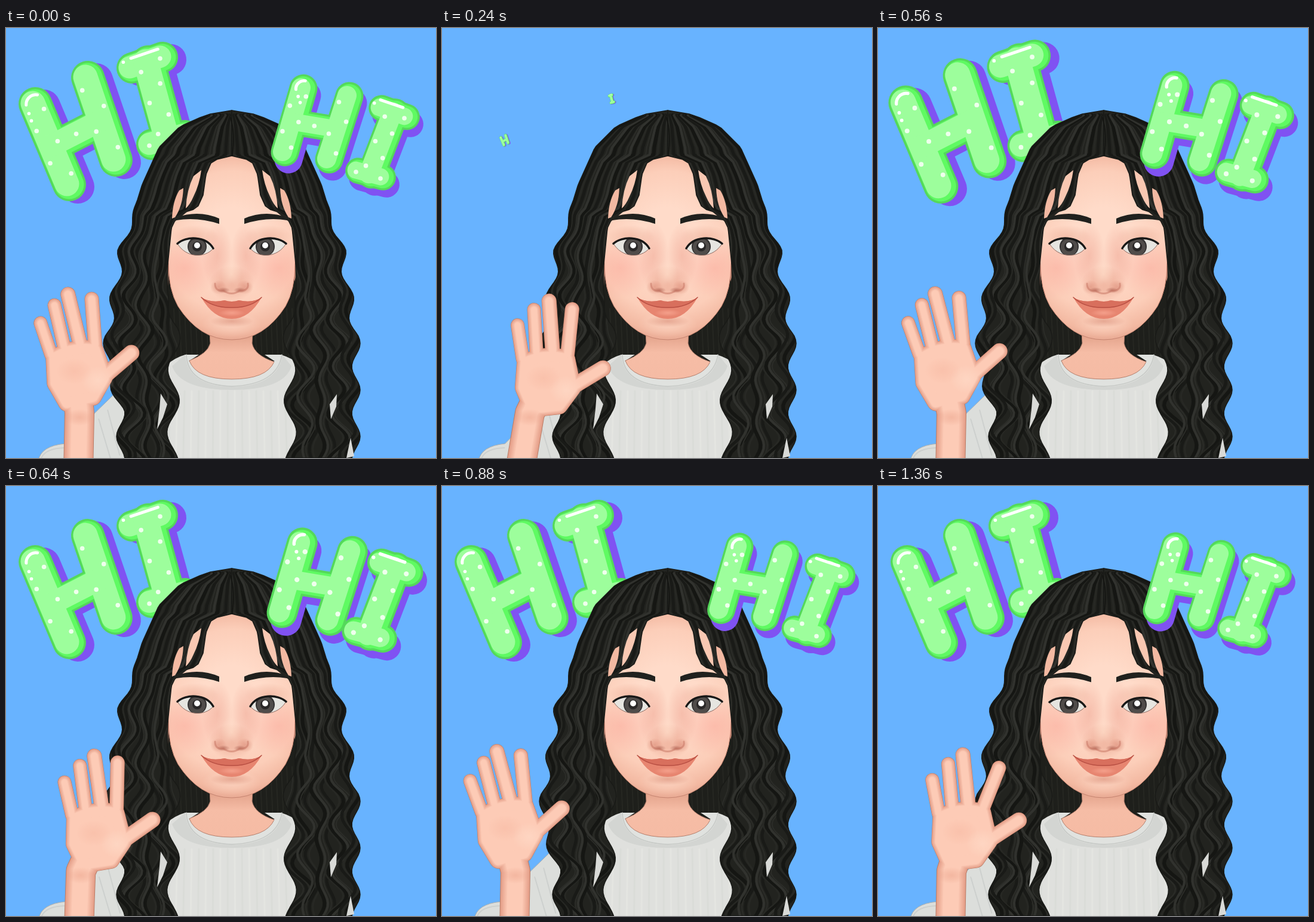
Recreate the animation shown at these times as an HTML page with a canvas. Size 720 by 720 pixels, loop 1.44 s.

```html
<!DOCTYPE html>
<html lang="en">
<head>
<meta charset="utf-8">
<title>Waving hello</title>
<style>
html, body { margin: 0; height: 100%; overflow: hidden; background: #68b3ff; }
canvas { display: block; width: 100vw; height: 100vh; }
</style>
</head>
<body>
<canvas id="stage" width="720" height="720"></canvas>
<script>
const ctx = document.getElementById('stage').getContext('2d');
const STEP = 80, STEPS = 18, MID = 378, TAU = 2 * Math.PI;
const mix = (a, b, t) => a + (b - a) * t;
const clamp = v => Math.max(0, Math.min(1, v));
const between = (p, q, t) => [mix(p[0], q[0], t), mix(p[1], q[1], t)];
const bump = (v, at, width) => Math.exp(-(((v - at) / width) ** 2));

// piecewise linear curve through [input, output] keys
function along(keys, v) {
  const i = Math.max(1, keys.findIndex(k => k[0] >= v));
  const [a, x] = keys[i - 1], [b, y] = keys[i];
  return mix(x, y, (v - a) / (b - a));
}
function trace(pts, close) {
  ctx.beginPath();
  pts.forEach(([x, y]) => ctx.lineTo(x, y));
  if (close) ctx.closePath();
}
function poly(pts, color) {
  trace(pts, true);
  ctx.fillStyle = color;
  ctx.fill();
}
function line(pts, width, color) {
  trace(pts);
  ctx.lineWidth = width;
  ctx.strokeStyle = color;
  ctx.stroke();
}
function shape(d, fill, stroke, width = 1) {
  const p = new Path2D(d);
  if (fill) { ctx.fillStyle = fill; ctx.fill(p); }
  if (stroke) { ctx.strokeStyle = stroke; ctx.lineWidth = width; ctx.stroke(p); }
}
function disc(x, y, r, color) {
  ctx.beginPath();
  ctx.arc(x, y, r, 0, TAU);
  ctx.fillStyle = color;
  ctx.fill();
}
// soft elliptical spot of colour
function glow(x, y, rx, ry, rgb, alpha) {
  ctx.save();
  ctx.translate(x, y);
  ctx.scale(rx, ry);
  const g = ctx.createRadialGradient(0, 0, 0, 0, 0, 1);
  [1, .55, 0].forEach((f, i) => g.addColorStop(i / 2, `rgba(${rgb},${alpha * f})`));
  disc(0, 0, 1, g);
  ctx.restore();
}
// draws once as is and once flipped about the middle of the face
function bothSides(paint) {
  [-1, 1].forEach(side => {
    ctx.save();
    ctx.translate(MID, 0);
    ctx.scale(side, 1);
    paint(side);
    ctx.restore();
  });
}

// ---- balloon letters: H has two stems, I has two serifs; the third bar joins them
const leftWord = { width: 56, shadow: [14, 4], letters: [
  { kind: 'H', bars: [[[49, 127], [106, 262]], [[137, 83], [184, 221]]], away: [-17, 12] },
  { kind: 'I', bars: [[[211, 67], [262, 49]], [[244, 195], [300, 180]]], away: [31, -4] }] };
const rightWord = { width: 47, shadow: [6, 12], letters: [
  { kind: 'H', bars: [[[498, 101], [467, 208]], [[575, 114], [541, 220]]], away: [3, 7] },
  { kind: 'I', bars: [[[629, 134], [671, 149]], [[590, 239], [631, 250]]], away: [2, 7] }] };

function dotsOn([p, q], count, flip, width) {
  const dx = q[0] - p[0], dy = q[1] - p[1], reach = width * .23 / Math.hypot(dx, dy);
  for (let i = 0; i < count; i++) {
    const [x, y] = between(p, q, (i + .5) / count), side = (i + flip) % 2 ? -reach : reach;
    disc(x - 3 + dy * side, y - dx * side, 3.8, '#efffed');
  }
}
function letter({ kind, bars: [a, b], away }, width, shadow, scale) {
  const isH = kind === 'H';
  const link = [between(...a, .53), between(...b, .53)];
  const center = between(...link, .5);
  const bars = [[a, isH ? 1 : .93], [b, isH ? 1 : .93], [link, isH ? .93 : 1.02]];
  const coat = (color, inset, dx, dy) => bars.forEach(([bar, f]) =>
    line(bar.map(([x, y]) => [x + dx, y + dy]), width * f - inset, color));
  ctx.save();
  ctx.translate(center[0] + away[0] * Math.max(0, 1 - scale), center[1] + away[1] * Math.max(0, 1 - scale));
  ctx.scale(scale, scale);
  ctx.translate(-center[0], -center[1]);
  coat('#8052f2', 0, ...shadow);
  coat('#55d85a', 0, 0, 0);
  coat('#5ffa62', 7, 0, 0);
  coat('#9dfe9c', 15, -4, -1);
  if (isH) {
    dotsOn(a, 5, 0, width);
    dotsOn(b, 4, 1, width);
    dotsOn(link, 1, 0, 0);
  } else {
    dotsOn(link, 5, 1, width);
    a.concat(b).forEach(([x, y], i) => i !== 0 && disc(x - 4, y + 2, 3.8, '#efffed'));
  }
  // gloss on the upper left rim
  const [x, y] = a[0], r = width * .29;
  if (isH) {
    ctx.beginPath();
    ctx.arc(x + 1, y + 1, r, Math.PI * .98, Math.PI * 1.55);
    ctx.lineWidth = 5;
    ctx.strokeStyle = '#fff';
    ctx.stroke();
    disc(x - r * .65, y + r, 2.8, '#fff');
    disc(x - r * .4, y + r * 1.75, 2.8, '#fff');
  } else {
    line([[x - 2, y - r], between([x, y - r], [a[1][0], a[1][1] - r], .85)], 5, '#fff');
    disc(x - r * .9, y - r * .6, 2.8, '#fff');
  }
  ctx.restore();
}
// springs from a speck to full size with a damped overshoot
const pop = age => age < 1 ? 0 : 1 - .91 * Math.exp(-.75 * (age - 1)) * Math.cos(.95 * (age - 1));
function word({ letters, width, shadow }, step, delay) {
  const scale = step < 2 ? 1 : pop(step - delay);
  if (scale) letters.forEach(l => letter(l, width, shadow, scale));
}

// ---- hair: half widths of the outer and inner edge at a given height
const outerKeys = [[138, 0], [145, 42], [165, 87], [200, 122], [262, 150], [372, 184], [515, 208], [720, 208]];
const innerKeys = [[214, 0], [222, 33], [245, 43], [280, 48], [302, 58], [312, 90], [335, 101], [395, 107], [440, 108], [500, 96], [720, 99]];
const outerAt = (y, side) => along(outerKeys, y)
  + 7 * clamp((y - 290) / 60) * Math.cos((y - 372) * TAU / 78)
  - (side < 0 ? 22 * clamp((y - 560) / 80) : 0);
const innerAt = y => y < 214 ? 0 : along(innerKeys, y) + 10 * clamp((y - 450) / 50) * Math.cos((y - 572) * TAU / 105);

function edge(from, to, width) {
  const pts = [];
  for (let y = from; y < to; y += 6) pts.push([width(y), y]);
  return pts.concat([[width(to), to]]);
}
function frontHair() {
  const tones = ['#2b2c28', '#191a17', '#272824', '#151613', '#31322e'];
  bothSides(side => {
    const outer = y => outerAt(y, side);
    const outline = edge(138, 720, outer).concat(edge(214, 720, innerAt).reverse());
    ctx.save();
    poly(outline, '#22231f');
    ctx.clip();
    for (let j = 0; j < 19; j++) {
      const lock = y => mix(innerAt(y), outer(y), (j + .5) / 19)
        + 9 * clamp((y - 330) / 170) * Math.sin(y / 13 + Math.floor(j / 4) * 1.7);
      line(edge(146, 720, lock), 2 + j * 3 % 5, tones[j % 5]);
    }
    ctx.restore();
    trace(outline, true);
    ctx.lineWidth = 1.5;
    ctx.strokeStyle = '#191a17';
    ctx.stroke();
    // skin between the loose strands
    shape('M51 238Q54 262 64 282Q70 296 77 302Q75 270 64 248Z', '#f9c8b2');
    shape('M81 268Q82 298 95 317L100 319Q99 290 88 272Z', '#f3b9a2');
    shape('M72 303Q84 313 97 323', null, '#22231f', 4);
  });
  shape('M376 150Q384 178 379 213', null, '#151613', 2);
  // shirt showing between the locks
  poly([[259, 612], [270, 630], [263, 652], [253, 672], [257, 638]], '#d9dad7');
  poly([[544, 655], [542, 630], [554, 613], [553, 634]], '#d9dad7');
  poly([[570, 720], [577, 686], [583, 717]], '#d9dad7');
}

// ---- body and face
function body() {
  poly([[250, 300], [505, 300], [500, 600], [250, 600]], '#1e1f1b');
  for (let x = 272; x < 490; x += 9) line([[x, 470], [x + 4, 560]], 2, '#262722');
  shape('M235 720L245 600Q262 558 300 547L460 547Q500 558 515 600L560 720Z', '#dfe0dd');
  for (let i = 0; i < 18; i++) line([[275 + i * 12, 608], [272 + i * 12.4, 720]], 3, i % 2 ? '#e4e5e1' : '#dadcd8');
  shape('M300 547Q304 599 378 601Q455 599 463 548L478 566Q466 606 378 606Q292 606 278 566Z', '#d3d5d2');
  shape('M302 547Q304 597 378 600Q454 597 462 547', '#e0e2df', '#c5c8c5', 1.5);
  shape('M306 558L326 545L430 545L450 558Z', '#1e1f1b');
  const neck = ctx.createLinearGradient(0, 505, 0, 590);
  neck.addColorStop(0, '#dd9a82');
  neck.addColorStop(.45, '#f6bda6');
  neck.addColorStop(1, '#f5bba4');
  shape('M340 490L342 528Q338 545 307 557Q318 588 378 588Q436 588 449 559Q416 548 412 528L414 490Z', neck, '#b5816f');
}
function eye(side, lid) {
  const x = v => MID + side * v;
  const corner = mix(361, 371, lid), inner = mix(369, 374, lid), top = mix(348, 380, lid);
  const upper = `M${x(91)} ${corner}C${x(77)} ${top} ${x(43)} ${top} ${x(31)} ${inner}`;
  const lower = `C${x(45)} 386 ${x(77)} 385 ${x(91)} ${corner}`;
  const iris = side < 0 ? 320 : 434;
  glow(x(61), 350, 40, 20, '222,140,115', .35);
  if (lid < 1) {
    const opening = new Path2D(upper + lower + 'Z');
    ctx.save();
    ctx.clip(opening);
    ctx.fillStyle = '#e6e5e0';
    ctx.fillRect(270, 340, 220, 50);
    disc(iris, 366, 16, '#343232');
    disc(iris, 367, 14, '#504c4a');
    disc(iris, 366, 8, '#2a2828');
    disc(iris, 364, 5, '#fff');
    ctx.restore();
    shape(upper + lower, null, '#8d6a60', 1);
  }
  shape(upper, null, '#181817', 3.5);
}
function face(lid) {
  const skin = ctx.createRadialGradient(MID, 350, 50, MID, 362, 172);
  [[0, '#ffdbc9'], [.55, '#fcceb9'], [.8, '#f3b9a2'], [1, '#e2a08a']].forEach(s => skin.addColorStop(...s));
  const outline = 'M262 250Q300 205 378 205Q456 205 495 250L484 395Q484 438 468 466Q432 522 378 522Q324 522 288 466Q272 438 272 395Z';
  shape('M273 395Q264 398 271 432Z M484 395Q490 400 483 425Z', '#e8a18a');
  shape(outline, skin, '#c58470');
  ctx.save();
  ctx.clip(new Path2D(outline));
  bothSides(() => {
    glow(78, 402, 58, 50, '248,130,120', .28);
    glow(24, 382, 26, 56, '228,128,110', .32);
    glow(22, 434, 14, 12, '205,115,95', .45);
  });
  glow(MID, 496, 50, 22, '255,220,202', .6);
  glow(MID, 428, 38, 30, '222,135,112', .5);
  glow(MID - 1, 412, 18, 26, '255,220,200', .65);
  bothSides(() => glow(14, 439, 11, 5, '165,85,70', .6));
  shape('M350 428Q350 441 364 440Q378 449 391 440Q407 440 405 428', null, 'rgba(190,108,90,.45)', 3);
  ctx.restore();
  glow(MID, 491, 36, 10, '205,120,98', .45);
  const upperLip = 'M327 451Q342 461 366 456Q378 460 390 456Q414 461 428 451';
  shape(upperLip + 'Q408 487 378 487Q347 487 327 451Z', '#e78570');
  shape(upperLip + 'Q409 469 378 468Q346 469 327 451Z', '#d86f5d');
  shape('M327 451Q346 469 378 468Q409 469 428 451', null, '#b74e42', 1.5);
  glow(MID, 477, 22, 6, '255,180,160', .55);
  eye(-1, lid);
  eye(1, lid);
  const top = 11 * lid, low = 6 * lid;
  bothSides(() => shape(`M21 ${319 + top}Q55 ${304 + top} 93 ${317 + top}L93 ${322 + low}Q58 ${316 + low} 21 ${328 + low}Z`, '#20211e'));
}

// ---- hand: each finger has angle, length, knuckle and width
const fingers = [
  [-28, 102, [-39, -34], 23], [-10, 118, [-16, -44], 23], [2, 131, [11, -47], 25],
  [20, 125, [36, -42], 24], [79, 97, [42, 14], 27]
];
const palmEdge = [[-34, -28], [-12, -36], [12, -38], [34, -34], [44, 14], [22, 44], [-22, 49], [-37, 14]];
// wave cycles by step: the hand lingers on the right, then swings through
const cycles = [[0, -.37], [3, 0], [5, .15], [8, .8], [11, 1.45], [14, 2], [17, 2.25]];

function handPose(step) {
  const cycle = along(cycles, step), phase = cycle - Math.floor(cycle);
  const sway = Math.cos(TAU * phase), reach = Math.max(0, sway);
  return {
    cx: 141 + 33 * sway, cy: 581 + 7 * sway,
    wrist: 123 + 24 * reach ** 2, elbow: 121 + 9 * sway * reach,
    tilt: -5 + 5 * sway + 27 * bump(phase, .15, .07),
    fan: 14 * bump(phase, .2, .1)
  };
}
function sleeve({ wrist }) {
  const dx = (wrist - 122) * .3;
  ctx.save();
  ctx.translate(dx, 0);
  shape('M54 724Q58 700 98 696L148 645L182 612L215 620V724Z', '#dcdedb', '#a9adad');
  shape('M58 722Q64 704 97 703M155 655L175 722M170 640L190 715', null, '#cdd0ce', 2);
  ctx.restore();
}
function hand({ cx, cy, wrist, elbow, tilt, fan }) {
  const turn = tilt * .8 * TAU / 360, cos = Math.cos(turn), sin = Math.sin(turn);
  const place = ([x, y]) => [cx + x * cos - y * sin, cy + x * sin + y * cos];
  const palm = palmEdge.map(place);
  const arm = [[elbow, 745], [wrist, 645], [mix(wrist, cx, .6), 612]];
  const bones = fingers.map(([angle, length, knuckle, width], i) => {
    const a = (angle + tilt + (i === 3 ? fan : 0)) * TAU / 360;
    return [[place(knuckle), [cx + length * Math.sin(a), cy - length * Math.cos(a)]], width];
  });
  // nested coats, from the dark rim to the light core
  for (let i = 0; i < 7; i++) {
    const t = (i - 1) / 5;
    const color = i ? `rgb(${mix(229, 253, t)},${mix(160, 203, t)},${mix(138, 182, t)})` : '#b57761';
    const inset = i ? 1 + (i - 1) * 2.4 : 0;
    line(arm, 50 - inset * 1.8, color);
    poly(palm, color);
    line([...palm, palm[0]], 30 - inset, color);
    bones.forEach(([bone, width]) => line(bone, width - inset, color));
  }
  glow(...place([34, 18]), 28, 24, '255,224,206', .5);
  glow(...place([-4, -2]), 30, 22, '236,155,130', .2);
  glow(wrist, 652, 25, 14, '226,145,120', .35);
}

const blink = step => clamp(1 - Math.abs(step - 14) * (step < 14 ? .5 : .3));

function draw(step) {
  ctx.lineCap = ctx.lineJoin = 'round';
  ctx.fillStyle = '#68b3ff';
  ctx.fillRect(0, 0, 720, 720);
  const pose = handPose(step);
  word(leftWord, step, 2);
  sleeve(pose);
  body();
  face(blink(step));
  frontHair();
  word(rightWord, step, 4);
  hand(pose);
}

const start = performance.now();
let shown = -1;
function tick() {
  const step = Math.floor((performance.now() - start) / STEP) % STEPS;
  if (step !== shown) draw(shown = step);
  requestAnimationFrame(tick);
}
tick();
</script>
</body>
</html>
```
